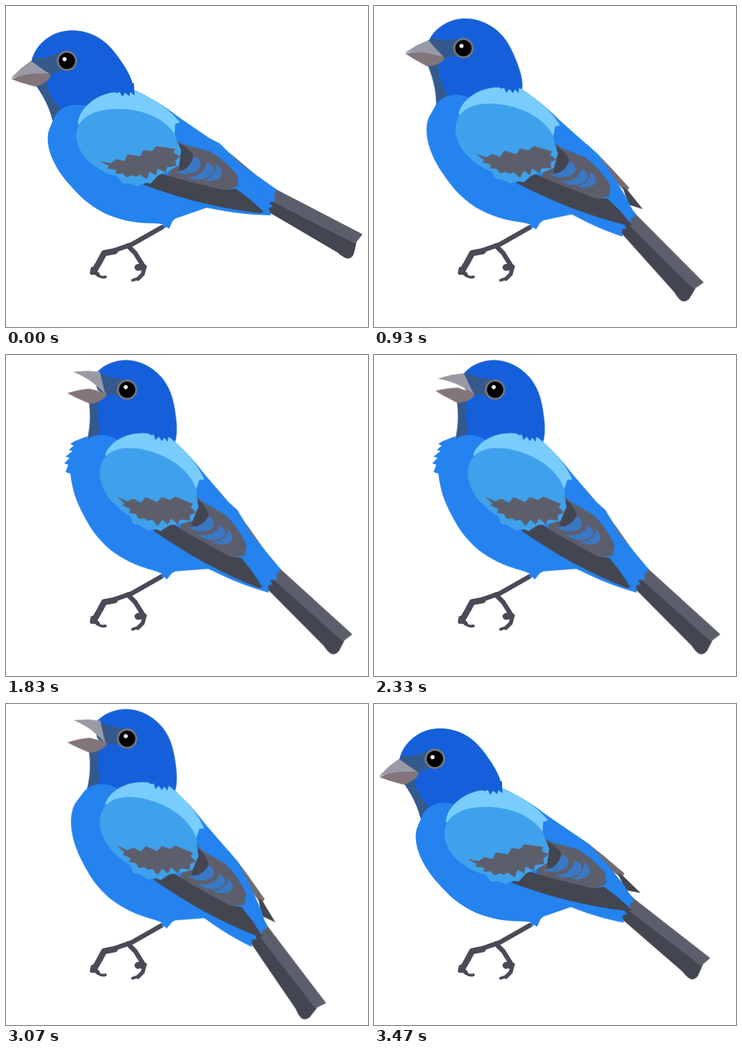
An HTML page for the animation above (3510 ms loop, 535x474 px).

```html
<!DOCTYPE html>
<html lang="en">
<head>
<meta charset="utf-8">
<title>Blue bird</title>
<style>
  html, body { margin: 0; width: 100%; height: 100%; overflow: hidden; background: #fff; }
  svg { display: block; width: 535px; height: 474px; }

  .sky { fill: #2483ee; }
  .royal { fill: #1560da; }
  .mask { fill: #36598c; }
  .slate { fill: #5c5e6c; }
  .dark { fill: #434550; }
  .leg { fill: none; stroke: #4a4a58; stroke-linecap: round; stroke-linejoin: round; }

  .body, .head, .tail, .upper, .lower, .ruffle { animation: 3510ms ease-in-out infinite; }
  .body { transform-origin: 237.6px 323.4px; animation-name: body; }
  .head { transform-origin: 135px 170px; animation-name: head; }
  .tail { transform-origin: 314px 175px; animation-name: tail; }
  .upper { transform-origin: 62px 99px; animation-name: upper; }
  .lower { transform-origin: 62px 101px; animation-name: lower; }
  .ruffle { transform-origin: 106px 150px; animation-name: ruffle; }

  @keyframes body {
    0%, 22.65% { transform: translate(0, 0) rotate(0deg); }
    30.5%, 91.2% { transform: translate(-2px, 2px) rotate(14.8deg); }
    98.8%, 100% { transform: translate(0, 0) rotate(0deg); }
  }
  @keyframes head {
    0%, 2% { transform: translate(0, 0) rotate(0deg); }
    10%, 14.5% { transform: translate(0, 0) rotate(7.6deg); }
    18.5%, 22.65% { transform: translate(0, 0) rotate(0deg); }
    30.5%, 91.2% { transform: translate(4px, -1px) rotate(11.6deg); }
    98.8%, 100% { transform: translate(0, 0) rotate(0deg); }
  }
  @keyframes tail {
    0%, 2% { transform: translate(0, 0) rotate(0deg); }
    9%, 40.7% { transform: translate(3px, 2px) rotate(10.5deg); }
    47%, 67.5% { transform: translate(0, 0) rotate(0deg); }
    74%, 100% { transform: translate(3px, 2px) rotate(10.5deg); }
  }
  /* song: the beak pulses between half and wide open every 310 ms */
  @keyframes upper {
    0%, 33% { transform: rotate(0deg); }
    35.47%, 44.3%, 53.13%, 61.97%, 70.8%, 79.63%, 87.6% { transform: rotate(16deg); }
    39.89%, 48.72%, 57.55%, 66.38%, 75.21%, 84.05% { transform: rotate(3deg); }
    91.5%, 100% { transform: rotate(0deg); }
  }
  @keyframes lower {
    0%, 33% { transform: rotate(0deg); }
    35.47%, 44.3%, 53.13%, 61.97%, 70.8%, 79.63%, 87.6% { transform: rotate(-19deg); }
    39.89%, 48.72%, 57.55%, 66.38%, 75.21%, 84.05% { transform: rotate(-15deg); }
    92.5%, 100% { transform: rotate(0deg); }
  }
  @keyframes ruffle {
    0%, 34% { transform: scale(0, .8); }
    37%, 70% { transform: scale(1, 1); }
    74%, 100% { transform: scale(0, .8); }
  }
</style>
</head>
<body>
<svg viewBox="0 0 535 474">
  <g class="leg">
    <path stroke-width="7" d="M230 327L186 352L160 361"/>
    <path stroke-width="9" d="M161 362L145 365L138 378L131 390"/>
    <path stroke-width="6" d="M128 388L127 394Q134 393 136 397"/>
    <path stroke-width="4" d="M135 396Q139 402 147 400"/>
    <path stroke-width="7" d="M180 354L191 365L201 381"/>
    <path stroke-width="10" d="M195 386L202 385"/>
    <path stroke-width="6" d="M205 385L202 396L195 403"/>
    <path stroke-width="4" d="M196 402L187 405"/>
  </g>

  <g class="body">
    <g class="tail">
      <path class="dark" d="M388 284L518 349L515 362Q514 371 506 373Q500 373 490 364L386 303Z"/>
      <path class="slate" d="M396 269L527 337L516 351L390 287Z"/>
    </g>

    <!-- far wing -->
    <path fill="#746b6c" d="M314 204L338 223L370 250L368 254L384 271L350 245Z"/>
    <path class="dark" d="M360 250L368 254L394 279L372 275Z"/>

    <path class="sky tail" d="M300 195L316 203L345 232L400 271L396 280L398 288L389 290L394 296L388 299L392 309Q350 309 298 298Z"/>

    <g class="head">
      <path class="royal" d="M38 80C44 56 68 36 97 36C140 36 160 66 172 84C183 100 189 115 188 123L160 140L120 185L72 186Q68 150 44 117L62 102Z"/>
      <path class="mask" d="M36 82L44 76Q56 78 66 74Q76 68 92 70L88 94Q76 94 64 104L50 100Z"/>
      <path class="mask" d="M44 117L59 112Q64 135 81 152L77 186H72Q68 150 44 117Z"/>
      <path class="lower" fill="#83757c" d="M8 108Q25 100 40 97L65 100L66 104Q60 115 43 119L22 113Z"/>
      <path class="upper" fill="#9a9aa6" d="M7 107L22 92L37 81Q46 88 64 100L40 100Q25 101 7 107Z"/>
      <circle cx="90" cy="81" r="15" fill="#77767b"/>
      <circle cx="90" cy="81" r="12"/>
      <circle cx="86.500" cy="78.500" r="3" fill="#fff"/>
    </g>

    <path class="sky" d="M69 170C75 150 98 141 118 148L165 127L192 125C222 139 245 156 258 166L318 207L346 238L370 268L384 291L370 300L296 298L250 314L246 318L241 329L237 326L234 329L231 322L221 321C165 321 128 304 95 265C65 232 57 200 64 182Z"/>
    <g transform="rotate(-14.8 237.6 323.4)">
      <path class="sky ruffle" d="M122 118L104 125L97 129L102 132L95 138L100 140L90 148L96 150L88 158L94 160L90 171L97 173L99 186L125 170Z"/>
    </g>

    <path fill="#78cdfd" d="M106 174C108 150 135 128 165 127L192 125C220 138 245 155 257 172L250 174L249 192L180 205Z"/>
    <path class="royal" d="M150 112L163 129L168 127L172 134L176 128L182 133L184 127L190 132L189 114Z"/>

    <!-- near wing -->
    <path class="slate" d="M250 197L262 204L300 214Q325 228 342 250L343 266L322 274L262 261L240 250Z"/>
    <path class="dark" d="M256 203Q280 215 278 230Q272 242 256 243Z"/>
    <g fill="#3a78c4">
      <path d="M277 222Q292 228 286 240Q272 252 250 246Q272 243 277 222Z"/>
      <path d="M297 231Q314 238 303 250Q290 261 268 253Q292 252 297 231Z"/>
      <path d="M310 234Q325 243 316 254Q306 260 293 258Q312 250 310 234Z"/>
    </g>
    <path class="dark" d="M203 264L228 247L262 257L322 272L340 270L360 285L381 304L376 306C320 300 260 285 203 264Z"/>
    <path fill="#3fa1eb" d="M104 192C104 165 130 152 165 152C208 152 238 170 250 190L253 200L259 213L256 235L240 244L225 250L214 262L205 261L195 266L183 262L172 262L165 252C135 245 105 222 104 192Z"/>
    <path class="slate" d="M138 229L155 232L163 226L175 229L180 219L198 222L203 213L216 214L222 207L250 211L248 217L258 222L250 228L252 236L238 238L236 246L224 240L222 250L212 245L208 256L198 249L192 252L186 250L178 253L172 247L162 248L163 242L150 240L152 236Z"/>
  </g>
</svg>
</body>
</html>
```
